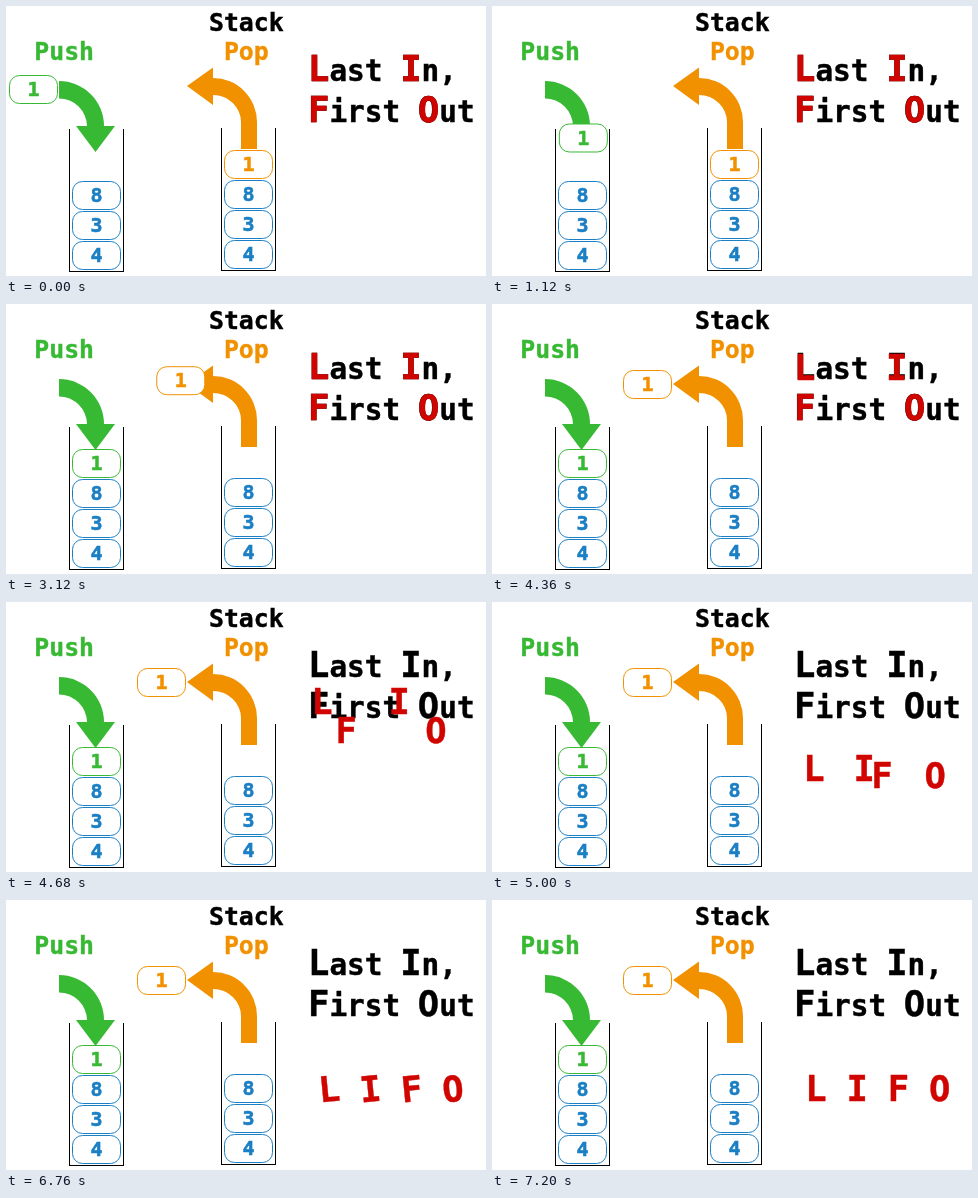
An HTML page for the animation above (7720 ms loop, 480 by 270 pixels).

```html
<!DOCTYPE html>
<html lang="en">
<head>
<meta charset="utf-8">
<title>Stack: push and pop</title>
<style>
  html, body { margin: 0; width: 100%; height: 100%; overflow: hidden; background: #fff; }
  svg { display: block; width: 480px; height: 270px; }
  text { font: bold 24.8px "DejaVu Sans Mono", monospace; text-anchor: middle; stroke: #000; stroke-width: .4px; }
  .box text { font-size: 20px; fill: currentColor; stroke-width: .6px; }
  .box rect { fill: #fff; stroke: currentColor; }
  .motto { font-size: 29.4px; text-anchor: start; }
  .big, .letter { font-size: 35.5px; }
  .letter { fill: #d00500; stroke: #d00500; }
  .wall { fill: none; stroke: #000; shape-rendering: crispEdges; }
  .green { fill: #38b934; color: #38b934; }
  .orange { fill: #f29100; color: #f29100; }
  .blue { color: #1b7fc4; }
  text.green, text.orange, .box text { stroke: currentColor; }
</style>
</head>
<body>
<svg id="stage" viewBox="0 0 480 270">
  <text x="240.3" y="25.3">Stack</text>
  <text class="green" x="58.2" y="53.8">Push</text>
  <text class="orange" x="240.3" y="53.8">Pop</text>
  <path class="wall" d="M63.5 123V265.5H117.5V123M215.5 122V264.5H269.5V122"/>
  <path class="green" d="M53 75A45 45 0 0 1 98 120H109L89.5 146L70 120H81A28 28 0 0 0 53 92.500Z"/>
  <path class="orange" d="M181 80L207 61.500V72A44 44 0 0 1 251 116V143H235V116A28 27 0 0 0 207 89V99Z"/>
  <text class="motto" x="302" y="75.4"><tspan class="big">L</tspan>ast <tspan class="big">I</tspan>n,</text>
  <text class="motto" x="302" y="116.2"><tspan class="big">F</tspan>irst <tspan class="big">O</tspan>ut</text>
</svg>
<script>
const LOOP = 7720, STEP = 40, MOVE = 960;
const START = { push: 480, pop: 2400, gather: 4320, jiggle: 6240 };
const stage = document.getElementById('stage');

function add(parent, tag, attrs, text = '') {
  const el = document.createElementNS('http://www.w3.org/2000/svg', tag);
  for (const key in attrs) el.setAttribute(key, attrs[key]);
  el.textContent = text;
  return parent.appendChild(el);
}

const place = (el, x, y) => el.setAttribute('transform', `translate(${x} ${y})`);

function addBox(color, label, x = 0, y = 0) {
  const box = add(stage, 'g', { class: 'box ' + color });
  add(box, 'rect', { x: -24, y: -14, width: 48, height: 28, rx: 10 });
  add(box, 'text', { y: 6.7 }, label);
  place(box, x, y);
  return box;
}

function addTraveller(color, d) {
  const path = document.createElementNS('http://www.w3.org/2000/svg', 'path');
  path.setAttribute('d', d);
  const box = addBox(color, 1), length = path.getTotalLength();
  return progress => {
    const { x, y } = path.getPointAtLength(length * progress);
    place(box, x, y);
  };
}

[8, 3, 4].forEach((label, i) => {
  addBox('blue', label, 90.5, 189.5 + 30 * i);
  addBox('blue', label, 242.5, 188.5 + 30 * i);
});
const movePushed = addTraveller('green',
  'M27.5 83.5C58 84 91.4 97 91.4 125C91.4 140 90.5 150 90.5 159.5');
const movePopped = addTraveller('orange',
  'M242.5 158.500C248 120 247 100 226 86C207 73 180 74 155.5 80.5');

const ROW_Y = 201.4;
const letters = [
  ['L', 312.7, 75.4], ['I', 404.9, 75.4], ['F', 312.7, 116.2], ['O', 422.6, 116.2]
].map(([char, x, y], i) => ({
  el: add(stage, 'text', { class: 'letter' }, char), x, y, endX: 324 + 41.2 * i
}));

const progressOf = (start, t) => Math.min(1, Math.max(0, (t - start) / MOVE));

// Same curve as CSS ease-in-out, solved by bisection.
function ease(p) {
  if (p <= 0 || p >= 1) return p;
  const curve = (s, a, b) => 3 * a * s * (1 - s) ** 2 + 3 * b * s * s * (1 - s) + s ** 3;
  let low = 0, high = 1;
  for (let i = 0; i < 24; i++) {
    const mid = (low + high) / 2;
    if (curve(mid, 0.42, 0.58) < p) low = mid; else high = mid;
  }
  return curve(low, 0, 1);
}

function draw() {
  const t = Math.floor(performance.now() % LOOP / STEP) * STEP;
  movePushed(ease(progressOf(START.push, t)));
  movePopped(ease(progressOf(START.pop, t)));

  const gather = ease(progressOf(START.gather, t));
  const tilt = -7 * Math.sin(progressOf(START.jiggle, t) * 5 * Math.PI);
  for (const { el, x, y, endX } of letters) {
    const nowX = x + (endX - x) * gather, nowY = y + (ROW_Y - y) * gather;
    el.setAttribute('transform', `translate(${nowX} ${nowY}) rotate(${tilt} 0 -5)`);
  }
  requestAnimationFrame(draw);
}
draw();
</script>
</body>
</html>
```
